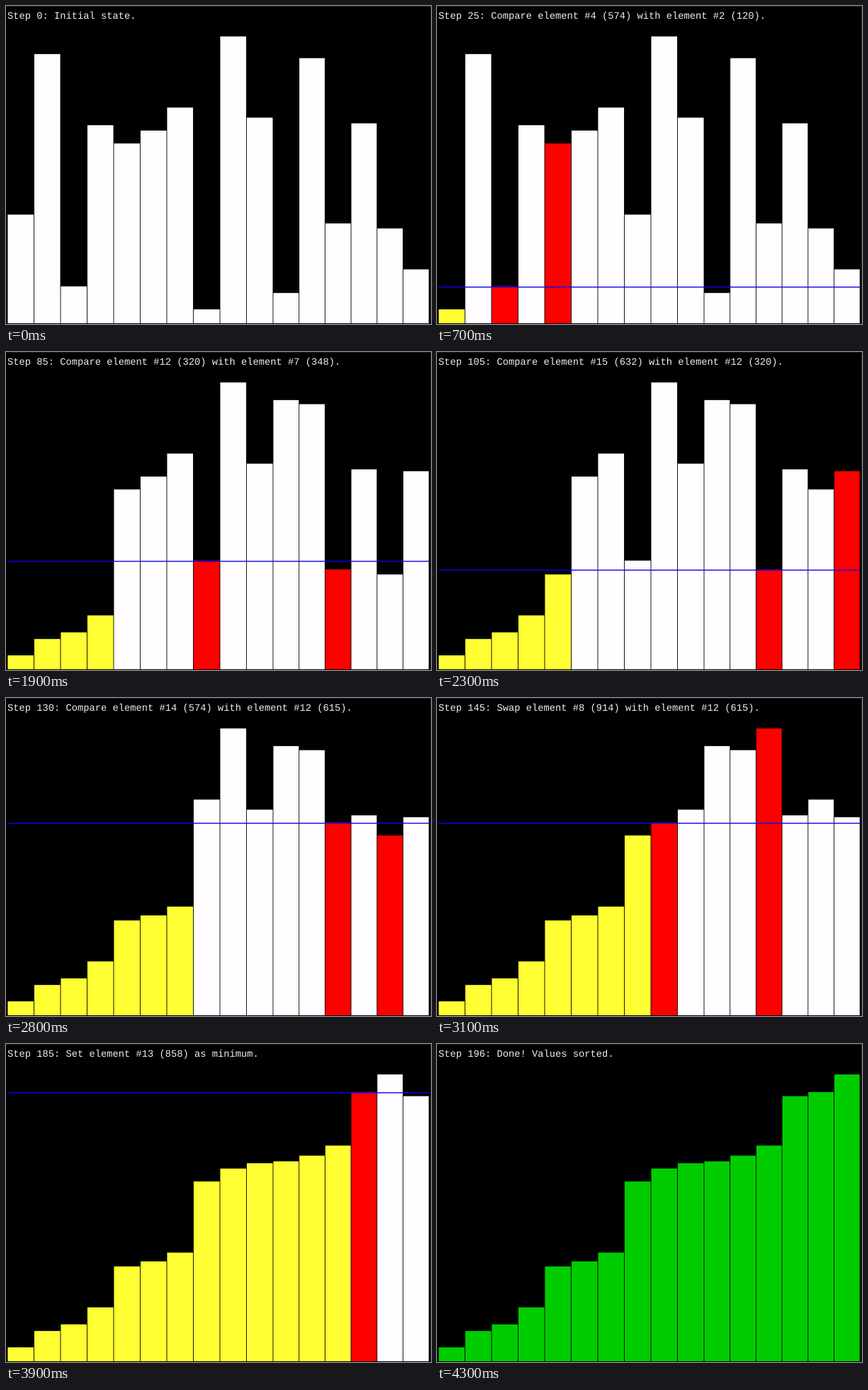
A matplotlib script for the animation above (5.5 s loop, 600x449 px).

```python
import matplotlib.pyplot as plt
from matplotlib.animation import FuncAnimation
from matplotlib.patches import Rectangle

WIDTH, HEIGHT, DPI = 600, 449, 100
FRAME_MS, LOOP_MS = 100, 5500
STEPS_PER_FRAME = 5
OPENING_FRAMES = 3

BASE, FLOOR, GAP = 449.2, 448, 0.9
BAR, ACTIVE, SORTED, DONE = "#fffdff", "#ff0000", "#ffff33", "#00cc00"
LINE, TEXT, BORDER = "#1000f0", "#f0f0f0", "#1c1c1c"
VALUES = [348, 858, 120, 632, 574, 615, 688, 47,
          914, 656, 99, 845, 320, 638, 304, 174]


def selection_sort_steps(values):
    """List every step as (message, values, active, sorted count, minimum)."""
    data = list(values)
    steps = []

    def name(i):
        return f"element #{i} ({data[i]})"

    def record(message, active=(), done=0, minimum=None):
        steps.append((f"Step {len(steps)}: {message}", tuple(data),
                      active, done, minimum))

    record("Initial state.")
    for i in range(len(data) - 1):
        low = i
        record(f"Set {name(i)} as minimum.", (i,), i, data[low])
        for j in range(i + 1, len(data)):
            record(f"Compare {name(j)} with {name(low)}.",
                   (j, low), i, data[low])
            if data[j] < data[low]:
                low = j
                record(f"Set {name(j)} as new minimum.", (j,), i, data[low])
        message = f"Swap {name(i)} with {name(low)}."
        data[i], data[low] = data[low], data[i]
        record(message, (i, low), i, data[i])
        record(f"Mark the elements #0 to #{i} as sorted.", (), i + 1, data[i])
    record("Done! Values sorted.", (), len(data))
    return steps


def slot_edge(k):
    """Boundary before slot k; the last six slots are slightly narrower."""
    return 2 + 37.5 * min(k, 10) + 36.7 * max(k - 10, 0)


def bar_top(value):
    return BASE - value * 4 / 9


STEPS = selection_sort_steps(VALUES)

plt.rcParams["text.hinting"] = "no_hinting"
fig = plt.figure(figsize=(WIDTH / DPI, HEIGHT / DPI), dpi=DPI, facecolor="black")
ax = fig.add_axes([0, 0, 1, 1])
ax.set_xlim(0, WIDTH)
ax.set_ylim(HEIGHT, 0)
ax.axis("off")


def add_rect(x, y, width, height, color):
    return ax.add_patch(Rectangle((x, y), width, height, fc=color, lw=0,
                                  snap=False))


add_rect(0, 0, WIDTH, 1, BORDER)
add_rect(WIDTH - 1, 0, 1, HEIGHT, BORDER)

bars = [add_rect(slot_edge(k) + GAP / 2, 0,
                 slot_edge(k + 1) - slot_edge(k) - GAP, 0, BAR)
        for k in range(len(VALUES))]
min_line = add_rect(2, 0, 595.5, 1.4, LINE)
label = ax.text(2, 18, "", color=TEXT, family="Liberation Mono",
                size=13.73 * 72 / DPI, va="baseline")


def draw(frame):
    tick = max(0, frame - OPENING_FRAMES + 1)
    step = min(tick * STEPS_PER_FRAME, len(STEPS) - 1)
    message, data, active, done, minimum = STEPS[step]
    finished = done == len(data)
    for k, (bar, value) in enumerate(zip(bars, data)):
        top = bar_top(value)
        bar.set_y(top)
        bar.set_height(FLOOR - top)
        if finished:
            color = DONE
        elif k in active:
            color = ACTIVE
        else:
            color = SORTED if k < done else BAR
        bar.set_facecolor(color)
    min_line.set_visible(minimum is not None)
    if minimum is not None:
        min_line.set_y(bar_top(minimum) + 0.3)
    label.set_text(message)
    return [*bars, min_line, label]


anim = FuncAnimation(fig, draw, frames=LOOP_MS // FRAME_MS, interval=FRAME_MS,
                     repeat=True, repeat_delay=0)
plt.show()
```
